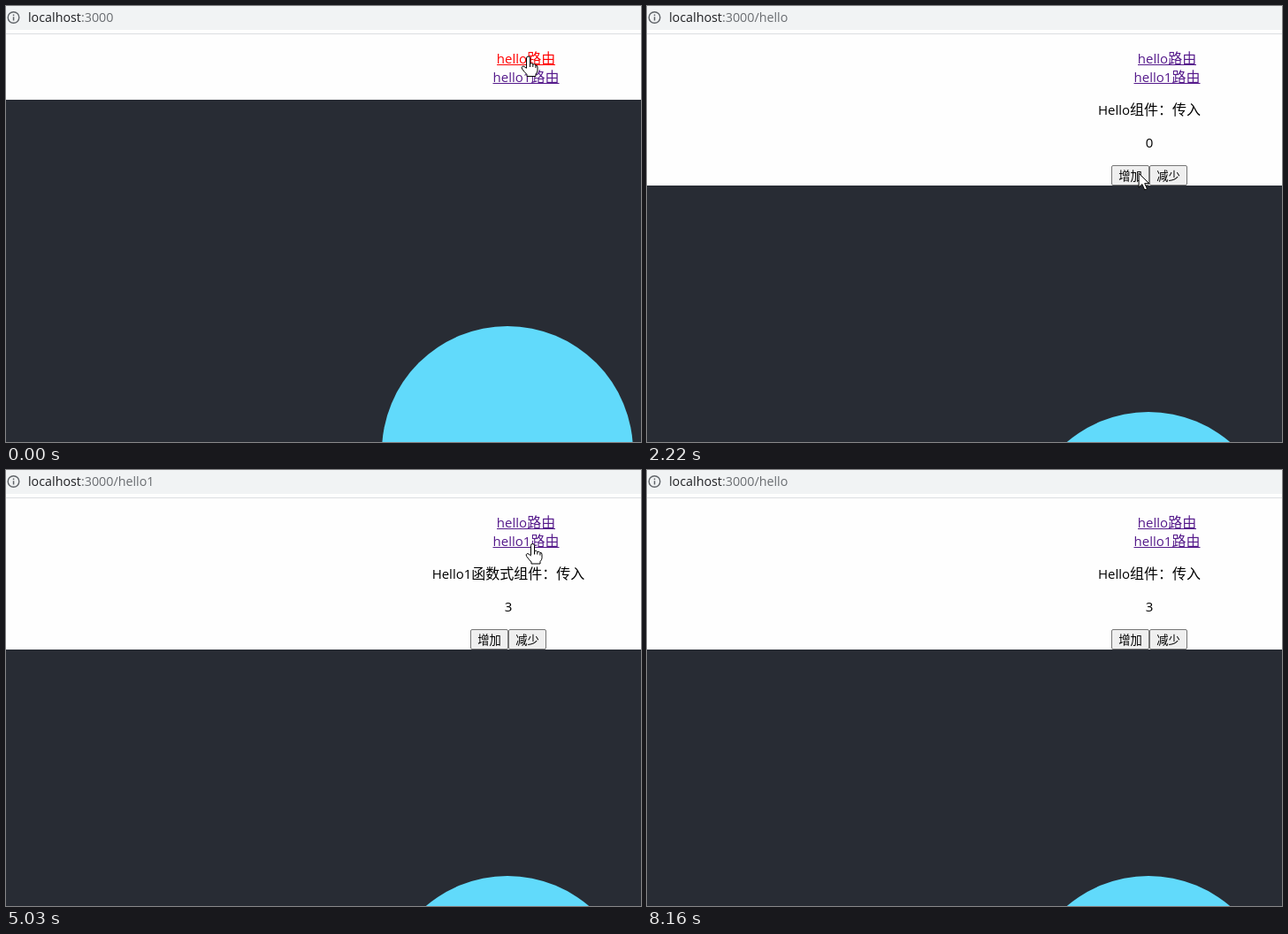
Write an HTML page that moves like this. It is 718x493 px and loops after 8.26 s.

```html
<!DOCTYPE html>
<html lang="zh-CN">
<head>
<meta charset="utf-8">
<title>Router demo</title>
<style>
  html, body { margin: 0; width: 100%; height: 100%; overflow: hidden; background: #fefefe; }
  svg { display: block; width: 100vw; height: 100vh; }
  text { font: 350 16px "Noto Sans CJK SC", "Noto Sans CJK", sans-serif; text-anchor: middle; }
  .latin { font: 15px "Open Sans", "Noto Sans", sans-serif; }
  .url { font: 14.3px "Open Sans", "Noto Sans", sans-serif; text-anchor: start; fill: #202124; }
  .url tspan { fill: #6a6d71; }
  .label { font-size: 13.33px; }
</style>
</head>
<body>
<svg id="stage" viewBox="0 0 718 493"></svg>
<script>
const LOOP = 8260;
const TICK = LOOP / 62;
const VISITED = '#551a8b';
const stage = document.getElementById('stage');

// Pointer tip: time, x, y
const path = [
  [0, 590.5, 57], [1240, 590.5, 57], [1900, 560, 180], [2200, 555.5, 190.5],
  [3040, 555.5, 190.5], [3300, 590, 89], [3420, 595.5, 83.5], [5400, 595.5, 83.5],
  [5690, 600, 58.5], [6900, 600, 58.5], [7400, 640, 220], [7850, 663, 495]
];

const HAND = 'M-2 13V2Q-2 0 0 0T2 2V8Q4.5 7 5.3 9Q7.5 8 8.4 10Q10.5 9.5 10.5 12V16' +
  'Q10.5 18 8.5 20V22.5H-1.5V20.5Q-4 18 -7 14Q-8 12 -6.3 11.1Q-5 10.5 -2 13.5';
const KNUCKLES = 'M2 8V12M5.3 9V12M8.4 10V13';
const ARROW = 'M0 0V16L3.8 12.4 6.6 18.8 9.4 17.6 6.6 11.5H11.5Z';

function pointerAt(t) {
  const i = path.findIndex(p => p[0] > t);
  if (i < 0) return null;
  const [t0, x0, y0] = path[i - 1], [t1, x1, y1] = path[i];
  const u = (t - t0) / (t1 - t0), k = u * u * (3 - 2 * u);
  return [x0 + (x1 - x0) * k, y0 + (y1 - y0) * k];
}

const rect = (x, y, w, h, fill) => `<rect x="${x}" y="${y}" width="${w}" height="${h}" fill="${fill}"/>`;

function text(str, x, y, fill = '#000') {
  const runs = str.replace(/[ -~]+/g, run => `<tspan class="latin">${run}</tspan>`);
  return `<text x="${x}" y="${y}" fill="${fill}">${runs}</text>`;
}

function link(str, y, width, pressed) {
  const color = pressed ? '#f00' : VISITED;
  return text(str, 588, y, color) + rect(588 - width / 2, y + 1, width, 1, color);
}

function button(str, x) {
  return `<rect x="${x + .5}" y="180.5" width="42" height="22" rx="1.5" fill="#efefef" stroke="#767676"/>
    <text class="label" x="${x + 21.5}" y="196.5">${str}</text>`;
}

function pointer(t) {
  const p = pointerAt(Math.floor(t / TICK + .01) * TICK);
  if (!p) return '';
  const overLink = p[1] > 50 && p[1] < 88;
  return `<g transform="translate(${p})" stroke="#000" stroke-linejoin="round">
    <path d="${overLink ? HAND : ARROW}" fill="#fff"/>${overLink ? `<path d="${KNUCKLES}"/>` : ''}</g>`;
}

function scene(t) {
  const route = t < 130 ? '' : t >= 4330 && t < 6210 ? '/hello1' : '/hello';
  const count = [2500, 2770, 3030].filter(click => t >= click).length;
  const top = route ? 203 : 106;
  const title = route === '/hello1' ? 'Hello1函数式组件：传入' : 'Hello组件：传入';

  return rect(0, 0, 718, 27, '#f1f3f4') + rect(0, 31, 718, 1, '#dcdee1') +
    `<circle cx="8.5" cy="13" r="6.3" fill="none" stroke="#5f6368" stroke-width="1.4"/>` +
    rect(7.8, 9.5, 1.5, 1.6, '#5f6368') + rect(7.8, 12.3, 1.5, 4.2, '#5f6368') +
    `<text class="url" x="25" y="18">localhost<tspan>:3000${route}</tspan></text>` +
    link('hello路由', 65, 66, t < 130 || t >= 6080 && t < 6210) +
    link('hello1路由', 86, 75, t >= 4130 && t < 4330) +
    (route ? text(title, 568, 123) + text(String(count), 568, 160) +
      button('增加', 525) + button('减少', 568) : '') +
    rect(0, top, 718, 493 - top, '#282c34') +
    `<circle cx="567" cy="${top + 398}" r="142" fill="#61dafb"/>` +
    pointer(t);
}

function draw() {
  stage.innerHTML = scene(performance.now() % LOOP);
  requestAnimationFrame(draw);
}
draw();
</script>
</body>
</html>
```
